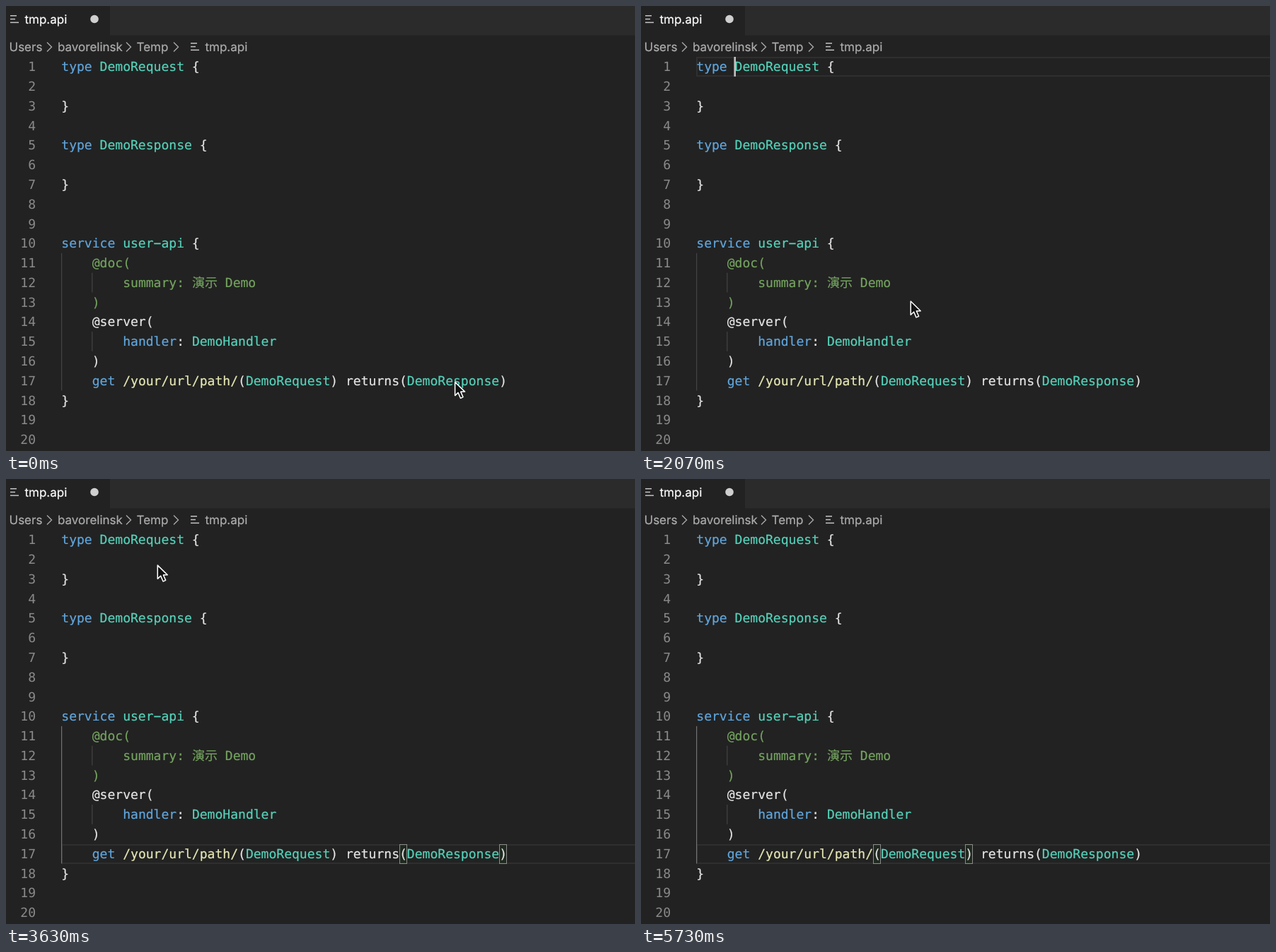
Write an HTML page that moves like this. It is 889 px wide and 630 px high and loops after 5760 ms.

```html
<!DOCTYPE html>
<html lang="zh">
<head>
<meta charset="utf-8">
<style>
html, body { margin: 0; width: 100%; height: 100%; overflow: hidden; background: #222; }
svg { display: block; width: 889px; height: 630px; }
text { white-space: pre; text-rendering: geometricPrecision; stroke-width: .2px; }
.code text { font: 18.04px "DejaVu Sans Mono", "Noto Sans CJK SC", "Noto Sans CJK", monospace; }
.ui text { font: 17px Inter, "Open Sans", sans-serif; fill: #adadad; stroke: #adadad; }
.ui .title { fill: #fff; stroke: #fff; }
.num { fill: #8a8a8a; text-anchor: end; }
.keyword { fill: #60a6dd; stroke: #60a6dd; }
.name { fill: #55d2ba; stroke: #55d2ba; }
.doc { fill: #74a35f; stroke: #74a35f; }
.path { fill: #e6e7b4; stroke: #e6e7b4; }
.plain { fill: #e6e6e6; stroke: #e6e6e6; }
.bracket { fill: rgba(0, 100, 0, .1); stroke: #8a8a8a; }
</style>
</head>
<body>
<svg id="stage" viewBox="0 0 889 630">
  <rect width="889" height="630" fill="#222"/>
  <g class="ui" id="ui">
    <rect x="147" width="742" height="41.5" fill="#2b2b2b"/>
    <circle cx="125" cy="18.5" r="5.8" fill="#cfcfcf"/>
    <text class="title" x="26.5" y="25">tmp.api</text>
    <text x="4.5" y="64">Users</text>
    <text x="73" y="64">bavorelinsk</text>
    <text x="184.5" y="64">Temp</text>
    <text x="281.5" y="64">tmp.api</text>
  </g>
  <rect id="line" x="79" width="830" height="26" fill="none" stroke="#2f2f2f" stroke-width="2"/>
  <g id="guides"></g>
  <g id="brackets"></g>
  <g class="code" id="code"></g>
  <rect id="caret" width="2.6" height="27.8" fill="#c2c2c2"/>
  <path id="mouse" d="M1.6 1.4v19.2l4.4-4.2 3.4 7.8 3.6-1.6-3.3-7.5h5.9z" fill="#111" stroke="#fff" stroke-width="1.5" stroke-linejoin="round"/>
</svg>
<script>
const LOOP = 5760, BLINK = 480;
const LEFT = 78.3, TOP = 72, CHAR = 10.861, ROW = 27.79, ROWS = 20;
const $ = id => document.getElementById(id);
const colX = col => LEFT + col * CHAR;
const rowY = row => TOP + (row - 1) * ROW;

const lines = `
type DemoRequest {

}

type DemoResponse {

}


service user\u2212api {
    @doc(
        summary: 演示 Demo
    )
    @server(
        handler: DemoHandler
    )
    get /your/url/path/(DemoRequest) returns(DemoResponse)
}`.split("\n");

function add(parent, tag, attrs, text) {
  const el = document.createElementNS("http://www.w3.org/2000/svg", tag);
  for (const key in attrs) el.setAttribute(key, attrs[key]);
  if (text) el.textContent = text;
  return parent.appendChild(el);
}

const tokens = /(type|service|get|handler|Demo\w+|user\u2212api|\/\S+\/)/;

function tokenClass(token) {
  if (/^(type|service|get|handler)$/.test(token)) return "keyword";
  if (/^(Demo|user)/.test(token)) return "name";
  return token[0] === "/" ? "path" : "plain";
}

let inDoc = false;
for (let n = 1; n <= ROWS; n++) {
  const y = rowY(n) + 20.2;
  add($("code"), "text", { x: 42, y, class: "num" }, String(n));
  const body = (lines[n] || "").trim();
  if (!body) continue;
  const text = add($("code"), "text", { x: colX(lines[n].indexOf(body)), y });
  if (body === "@doc(") inDoc = true;
  for (const part of inDoc ? [body] : body.split(tokens))
    if (part) add(text, "tspan", { class: inDoc ? "doc" : tokenClass(part) }, part);
  if (body === ")") inDoc = false;
}

function guide(x, from, to) {
  return add($("guides"), "rect", {
    x, y: rowY(from), width: 1.2, height: (to - from + 1) * ROW, fill: "#444"
  });
}
const block = guide(78, 11, 17);
guide(121.2, 12, 12);
guide(121.2, 15, 15);

const fileIcon = (x, y) => [9, 7, 12].forEach((width, i) =>
  add($("ui"), "rect", { x, y: y + i * 4.8, width, height: 1.5, fill: "#c4c4c4" }));
fileIcon(6, 13);
fileIcon(261, 52);

for (const x of [58, 170, 237])
  add($("ui"), "path", { d: `M${x} 51.5l6.5 6.5-6.5 6.5`, fill: "none", stroke: "#a8a8a8", "stroke-width": 1.4 });

const pair = [0, 1].map(() => add($("brackets"), "rect", { class: "bracket", width: 10, height: 27 }));

// Pointer moves; ease slows the end, bend curves the path
const start = { x: 633, y: 531 };
const moves = [
  { from: 730, to: 930, x: 432, y: 531 },
  { from: 930, to: 1300, x: 432, y: 524 },
  { from: 1930, to: 2450, x: 195, y: 188, bend: 1.15 },
  { from: 3270, to: 4100, x: 221, y: 89, ease: 2 },
  { from: 4600, to: 5100, x: 892, y: 27 }
];

function pointerAt(t) {
  let { x, y } = start;
  for (const { from, to, x: toX, y: toY, ease = 1, bend = 1 } of moves) {
    if (t <= from) break;
    const k = 1 - (1 - Math.min((t - from) / (to - from), 1)) ** ease;
    x += (toX - x) * k ** bend;
    y += (toY - y) * k ** (1 / bend);
  }
  return { x, y };
}

// A click puts the caret under the pointer, then it jumps to the same name elsewhere
function visit({ click, jump }) {
  const { x, y } = pointerAt(click);
  const row = Math.floor((y - TOP) / ROW) + 1;
  const col = Math.round((x - LEFT) / CHAR);
  const word = [...lines[row].matchAll(/\w+/g)].find(m => m.index + m[0].length >= col);
  const target = lines.findIndex((line, n) => n !== row && line.includes(word[0]));
  return [
    { since: click, row, col },
    { since: (click + jump) / 2, row, col: word.index },
    { since: jump, row: target, col: lines[target].indexOf(word[0]) }
  ];
}
const carets = [
  { click: 30, jump: 230 },
  { click: 1500, jump: 1600 },
  { click: 2740, jump: 2770 },
  { click: 4200, jump: 4270 }
].flatMap(visit);

const show = (el, on) => el.setAttribute("visibility", on ? "visible" : "hidden");

function drawCaret(t) {
  const now = carets.filter(c => c.since <= t).pop();
  const { since, row, col } = now || { row: 0 };
  const open = now && lines[row][col - 1] === "(";
  show($("line"), now);
  show($("caret"), now && Math.floor((t - since) / BLINK) % 2 === 0);
  pair.forEach(box => show(box, open));
  block.setAttribute("fill", row === 17 ? "#737373" : "#444");
  if (!now) return;
  $("line").setAttribute("y", Math.round(rowY(row)) + 1);
  $("caret").setAttribute("x", colX(col) - 1.2);
  $("caret").setAttribute("y", rowY(row));
  if (!open) return;
  [col - 1, lines[row].indexOf(")", col)].forEach((at, i) => {
    pair[i].setAttribute("x", Math.round(colX(at)) + .5);
    pair[i].setAttribute("y", Math.round(rowY(row)) + .5);
  });
}

function draw(t) {
  drawCaret(t);
  const { x, y } = pointerAt(t);
  $("mouse").setAttribute("transform", `translate(${x} ${y})`);
}

// The picture moves at 30 steps per second
function tick() {
  const step = Math.floor((performance.now() % LOOP + 4) * .03);
  draw(Math.min(Math.round(step / .3) * 10, LOOP - 30));
  requestAnimationFrame(tick);
}
tick();
</script>
</body>
</html>
```
